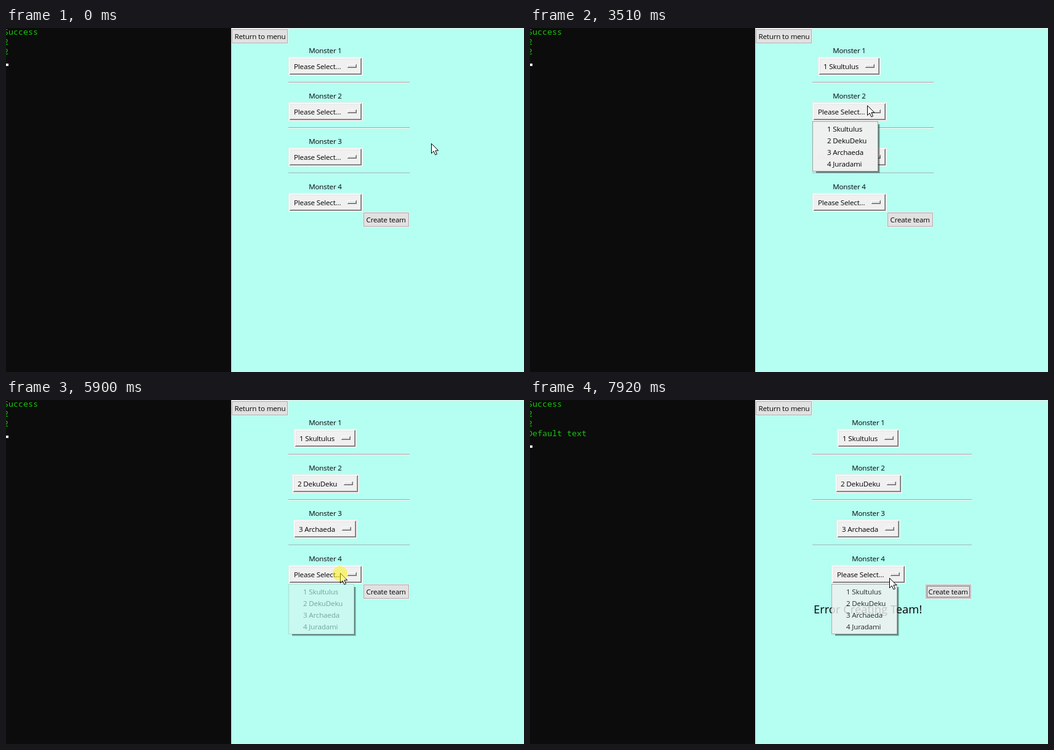
Recreate the animation shown at these times as an HTML page. Size 842 by 561 pixels, loop 8 s.

```html
<!DOCTYPE html>
<html lang="en">
<head>
<meta charset="utf-8">
<title>Team builder</title>
<style>
  html, body { margin: 0; width: 100%; height: 100%; overflow: hidden; background: #0c0c0c; }
  svg { display: block; }
  text { white-space: pre; }
  .ui { font: 11.6px "Open Sans", "Noto Sans", sans-serif; letter-spacing: -.17px; }
  .log { font: 13.33px "Noto Sans Mono", "DejaVu Sans Mono", monospace; fill: #16c60c; }
  .error { font: 18.4px "Open Sans", "Noto Sans", sans-serif; }
</style>
</head>
<body>
<svg id="stage" width="842" height="561" viewBox="0 0 842 561"></svg>
<script>
const LOOP = 8000;
const TRAVEL = 300;          // longest time the pointer takes between stops
const FRAME = 77;            // pace of the menu fade
const ROW = 74, ITEM = 19;
const NAMES = ["1 Skultulus", "2 DekuDeku", "3 Archaeda", "4 Juradami"];
const EMPTY = "Please Select...";

// How long before a press the pointer rests, and how long the press lasts
const ACTS = {
  pass: { rest: 0, hold: 0 },
  open: { rest: 0, hold: 80 },
  pick: { rest: 140, hold: 150 },
  send: { rest: 70, hold: 150 }
};

const stop = (act, at, x, y) => ({ act, at, x, y, ...ACTS[act] });
const STORY = [
  stop("pass", 0, 691, 188),
  stop("pass", 1000, 580, 18),
  stop("open", 1080, 563, 63),
  stop("pass", 1790, 548, 90),
  stop("pick", 2970, 548, 90),
  stop("open", 3270, 548, 126),
  stop("pick", 4120, 526, 191),
  stop("open", 4350, 536, 205),
  stop("pick", 5140, 534, 278),
  stop("pass", 5450, 543, 282),
  stop("open", 5580, 543, 282),
  stop("open", 5890, 543, 282),
  stop("send", 6430, 630, 312),
  stop("pass", 7270, 548, 78),
  stop("open", 7830, 584, 290)
];

const stage = document.getElementById("stage");
const pen = document.createElement("canvas").getContext("2d");
pen.font = '11.6px "Open Sans", "Noto Sans", sans-serif';
const textWidth = s => Math.round(pen.measureText(s).width - .17 * s.length);

const rect = (x, y, w, h, fill, extra = "") =>
  `<rect x="${x}" y="${y}" width="${w}" height="${h}" fill="${fill}" ${extra}/>`;

const label = (x, y, text, cls = "ui", extra = "") =>
  `<text x="${x}" y="${y}" class="${cls}" ${extra}>${text}</text>`;

// Replays the story up to t: pointer, choices, open menu, error
function stateAt(t) {
  const s = { x: STORY[0].x, y: STORY[0].y, picked: 0, menu: null, failed: false, pressed: false };
  let free = 0;
  for (const { act, at, x, y, rest, hold } of STORY) {
    const arrive = at - rest;
    const leave = Math.max(free, arrive - TRAVEL);
    if (t < leave) break;
    const f = arrive > leave ? Math.min(1, (t - leave) / (arrive - leave)) : 1;
    s.x = Math.round(s.x + (x - s.x) * f);
    s.y = Math.round(s.y + (y - s.y) * f);
    free = at + hold;
    if (t < at) break;
    s.pressed = t < free;
    if (act === "open") s.menu = { row: s.picked, since: at };
    if (t < free || act === "open" || act === "pass") continue;
    s.menu = null;
    if (act === "pick") s.picked++;
    else s.failed = true;
  }
  return s;
}

function raised(x, y, w, h) {
  return rect(x, y, w, h, "#696969") + rect(x, y, w - 1, h - 1, "#fff") +
    rect(x + 1, y + 1, w - 2, h - 2, "#a0a0a0") + rect(x + 1, y + 1, w - 3, h - 3, "#e3e3e3") +
    rect(x + 2, y + 2, w - 4, h - 4, "#f0f0f0");
}

function picker(centre, y, text) {
  const w = textWidth(text) + 45;
  const x = Math.floor(centre - w / 2);
  return rect(x, y, w, 31, "#f0f0f0") + raised(x + 2, y + 2, w - 4, 27) +
    label(x + 9, y + 20, text) + raised(x + w - 25, y + 12, 15, 6);
}

function button(x, y, w, text, focus) {
  const box = rect(x - 1, y - 1, w + 2, 25, "#f0f0f0") +
    rect(x + .5, y + .5, w - 1, 22, "#e1e1e1", 'stroke="#adadad"');
  const dots = focus
    ? rect(x + 2.5, y + 2.5, w - 5, 18, "none", 'stroke="#000" stroke-dasharray="1 1"') : "";
  return box + dots + label(x + 4.5, y + 16, text);
}

function menu(x, y, age, px, py) {
  const w = 107, h = NAMES.length * ITEM + 6;
  const alpha = 1 - .65 * .28 ** Math.floor(age / FRAME);
  let shadow = "";
  for (let i = 0; i < 3; i++) {
    const ink = `fill-opacity="${.55 - .18 * i}"`;
    shadow += rect(x + w + i, y + 5, 1, h - 5 + i, "#000", ink) +
      rect(x + 6, y + h + i, w - 5 + i, 1, "#000", ink);
  }
  const hover = px > x && px < x + w ? Math.floor((py - y - 3) / ITEM) : -1;
  const items = NAMES.map((name, i) => {
    const top = y + 3 + i * ITEM, on = i === hover;
    return (on ? rect(x + 3, top, w - 6, ITEM, "#0078d7") : "") +
      label(x + 24, top + 14, name, "ui", on ? 'fill="#fff"' : "");
  }).join("");
  const body = rect(x + .5, y + .5, w - 1, h - 1, "#f0f0f0", 'stroke="#a0a0a0"');
  return `${shadow}<g opacity="${alpha}">${body}${items}</g>`;
}

function pointer({ x, y, pressed }) {
  const arrow = `<path transform="translate(${x + .5} ${y + .5})" fill="#fff" stroke="#000"
    d="M0 0V16L3.7 12.4L6.4 18.4L9 17.3L6.4 11.4H11.3Z"/>`;
  const glow = `<circle cx="${x}" cy="${y + 1}" r="12" fill="#fff200" fill-opacity=".5"/>`;
  return arrow + (pressed ? glow : "");
}

function terminal(failed) {
  const lines = ["Success", "2", "2"].concat(failed ? ["Default text"] : []);
  return rect(0, 0, 366, 561, "#0c0c0c") +
    lines.map((s, i) => label(-4, 11 + i * 16, s, "log")).join("") +
    rect(0, 10 + lines.length * 16, 4, 4, "#f2f2f2");
}

function scene(t) {
  const s = stateAt(t);
  // The error line widens the column and recentres the form
  const shift = s.failed ? 31 : 0;
  const right = 656 + 2 * shift;
  let out = terminal(s.failed) + rect(366, 0, 476, 561, "#b4fff1") +
    rect(366, 0, 476, 1, "#f0f0f0") + button(367, 2, 91, "Return to menu");

  for (let row = 0; row < 4; row++) {
    const y = row * ROW;
    out += label(519 + shift, 41 + y, `Monster ${row + 1}`, "ui", 'text-anchor="middle"') +
      picker(519.5 + shift, 47 + y, row < s.picked ? NAMES[row] : EMPTY);
    if (row < 3) {
      out += rect(459, 88 + y, right - 459, 1, "#a0a0a0") + rect(459, 89 + y, right - 459, 1, "#fff");
    }
  }
  out += button(right - 75, 301, 74, "Create team", s.failed);
  if (s.failed) out += label(461, 348, "Error Creating Team!", "error");
  if (s.menu) out += menu(459 + shift, 78 + s.menu.row * ROW, t - s.menu.since, s.x, s.y);
  return out + pointer(s);
}

function draw() {
  stage.innerHTML = scene(performance.now() % LOOP);
  requestAnimationFrame(draw);
}
draw();
</script>
</body>
</html>
```
